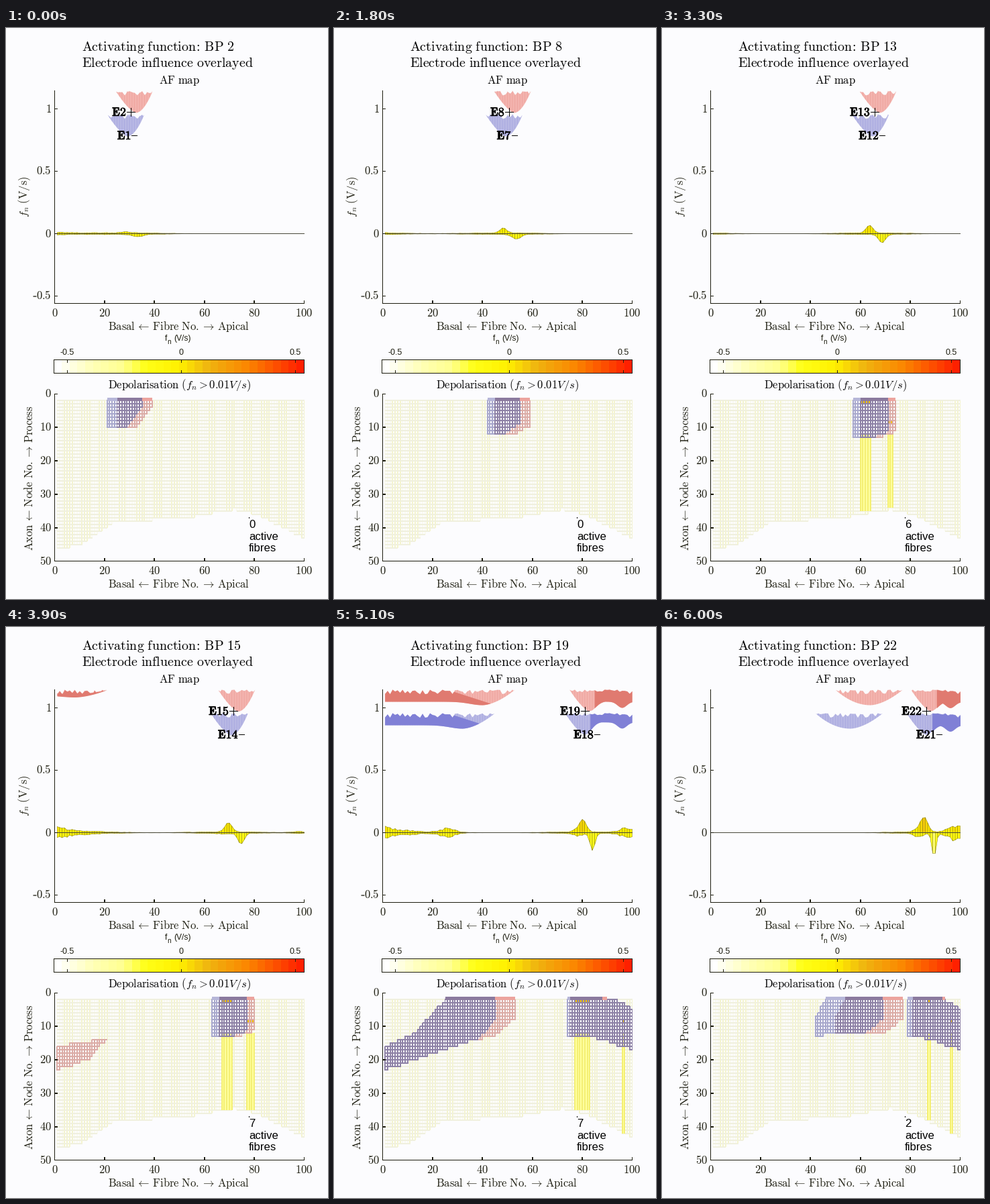
These frames come from a looping animation (480 px wide and 851 px high, 6.3 s). A matplotlib script:

```python
import numpy as np
import matplotlib.pyplot as plt
from matplotlib.animation import FuncAnimation
from matplotlib.collections import LineCollection, PolyCollection
from matplotlib.colors import LinearSegmentedColormap
from matplotlib.patches import Rectangle
from matplotlib.patheffects import withStroke

plt.rcParams["mathtext.fontset"] = "cm"
plt.rcParams["font.family"] = "Liberation Sans"

W, H, DPI = 480, 851, 100
PX = 72 / DPI
INK, BG = "#1d1d10", "#fcfcfe"

fig = plt.figure(figsize=(W / DPI, H / DPI), dpi=DPI, facecolor=BG)
ax = fig.add_axes([0, 0, 1, 1])
ax.set_xlim(0, W)
ax.set_ylim(H, 0)
ax.set_autoscale_on(False)
ax.axis("off")

heat = LinearSegmentedColormap.from_list("heat", [
    (0, "#ffffff"), (.15, "#ffffb4"), (.27, "#ffff90"), (.36, "#ffff18"),
    (.5, "#fff000"), (.62, "#efb410"), (.78, "#fb8600"), (1, "#ff2000")], N=32)

fibres = np.arange(1, 101)
nodes = np.arange(51)
fine = np.linspace(1, 100, 397)
teeth = np.random.default_rng(4).uniform(0, 1, 100) ** 2 * 7
floor = np.round(np.interp(fibres, [1, 10, 25, 53, 72, 81, 100],
                           [46.4, 45, 38, 37, 34.4, 36, 43]))


def fx(f):
    return 72.5 + 3.72 * f


def vy(v):
    return 306.5 - 186 * v


def ny(k):
    return 545.5 + 4.98 * k


def bell(x, c, w):
    return np.exp(-((x - c) / w) ** 2)


def label(x, y, s, size, ha="center", color=INK, **kw):
    return ax.text(x, y, s, fontsize=size * PX, ha=ha, va="baseline", color=color, **kw)


def roman(s):
    return rf"$\mathrm{{{s}}}$"


def lines(segs, color, lw=1, z=2, aa=False, **kw):
    c = LineCollection(segs, colors=color, linewidths=lw * PX, zorder=z,
                       antialiaseds=aa, snap=False, **kw)
    return ax.add_collection(c, autolim=False)


def box(x0, x1, y0, y1, color, z):
    return ax.add_patch(Rectangle((x0, y0), x1 - x0, y1 - y0, color=color, lw=0, zorder=z))


def runs(values):
    """Split integers into stretches of neighbours."""
    parts = np.split(values, np.where(np.diff(values) > 1)[0] + 1)
    return [(p[0], p[-1]) for p in parts if len(p)]


def centre(n):
    return np.interp(n, [1, 8, 15, 18, 22], [29, 52.5, 73.5, 81.1, 88.3])


def main_lobe(n):
    c = centre(n)
    return c - 8, c, c + 6.8 + 6 * max(0, n - 15)


def side_lobe(n):
    """Influence on the neighbouring turn, for the apical electrodes."""
    b = 8 * n - 99
    return (1 if n < 20 else b - 27), b


def depth(n):
    """Depth in pixels of an electrode's surface: main lobe and side lobe."""
    lo, c, hi = main_lobe(n)
    left = 1 - np.clip((c - fine) / (c - lo), 0, 1) ** 1.4
    right = 1 - np.clip((fine - c) / (hi - c), 0, 1) ** 1.9
    if n > 16:
        valley = min(.14 * (n - 15), .55)
        right = np.maximum(valley + (1 - valley) * bell(fine, c, 3.6) - .02,
                           valley + .28 * bell(fine, 96, 2.6))
    main = 32.5 * np.where(fine < c, left, right)
    side = np.zeros_like(fine)
    if n >= 15:
        a, b = side_lobe(n)
        peak = b - 13
        rise = .78 + .22 * bell(fine, peak, 7)
        if a > 1:
            rise = 1 - np.clip((peak - fine) / (peak - a), 0, 1) ** 2
        fall = 1 - np.clip((fine - peak) / 13, 0, 1) ** 1.7
        side = min(5 * n - 64, 23) * np.where(fine < peak, rise, fall)
    return main, side


def cone(n, y0, light, dense):
    main, side = depth(n)
    d = np.maximum(main, side)
    x, low, on = fx(fine), y0 + d, d > .2
    top = y0 + np.minimum(np.interp(fine, fibres, teeth), d * .6)
    out = [ax.fill_between(x, top, low, where=on, color=light, lw=0, zorder=3)]

    # Overlapping layers look denser towards the turn's ends
    shade = np.maximum(top, y0 + 1.2 * (fine - 26) * (fine < 46))
    thick = (side > .2) & (fine < 46) & (shade < low)
    if n > 16:
        thick |= fine > centre(n) + 2
    out.append(ax.fill_between(x, shade, low, where=thick, color=dense, lw=0, zorder=3))
    segs = [[(x[i], top[i]), (x[i], low[i])] for i in range(0, len(x), 4) if on[i]]
    out.append(lines(segs, dense, .8, 3.1, aa=True, alpha=.3))
    return out


def node_mask(n):
    """Fibre by node cells reached by an electrode."""
    f, k = fibres[:, None], nodes[None]
    lo, _, hi = main_lobe(n)
    top = 2 + .375 * np.maximum(0, f - 92)
    bottom = (min(9.2 + .33 * n, 13) + .25 * np.maximum(0, f - 84)
              - max(.3, 1.2 - .1 * n) * np.maximum(0, f - hi + 6))
    m = (f >= lo) & (f <= hi) & (k >= np.floor(top)) & (k <= np.round(bottom))
    if n >= 15:
        a, b = side_lobe(n)
        grown = min((n - 15) / 3, 1)
        top = (grown * np.interp(f, [1, 13, 22, 26], [16, 12, 4, 2])
               + (1 - grown) * (16 - .1 * f))
        if a > 1:
            top = top + 1.2 * np.maximum(0, a + 4 - f)
        bottom = (np.interp(f, [1, 13, 32, 48], [23, 20, 15, 12])
                  - .6 * np.maximum(0, f - b + 7))
        m |= (f >= a) & (f <= b) & (k >= np.round(top)) & (k <= np.round(bottom))
    return m


def mesh(m, color, z):
    segs = [[(fx(i + 1), ny(k)), (fx(i + 1), ny(k + 1))]
            for i, k in np.argwhere(m[:, :-1] & m[:, 1:])]
    segs += [[(fx(i + 1), ny(k)), (fx(i + 2), ny(k))]
             for i, k in np.argwhere(m[:-1] & m[1:])]
    return lines(segs, color, 1, z)


def influence(n):
    neg, pos = node_mask(n - 1), node_mask(n)
    out = [mesh(neg, "#a8a8cc", 2), mesh(pos, "#dbaca6", 2.1),
           mesh(neg & pos, "#8e82a6", 2.2)]
    bar_neg = neg[:, 2] & (fibres < centre(n - 1) + 7.5)
    bar_pos = pos[:, 2] & (fibres < centre(n) + 7.5)
    for on, color, z in ((bar_neg, "#b6b6d8", 2.3), (bar_pos, "#eca49e", 2.4),
                         (bar_neg & bar_pos, "#8b7a9e", 2.5)):
        out += [box(fx(a), fx(b), 551, 556, color, z) for a, b in runs(fibres[on])]
    return out


def envelope(n):
    """Upper and lower extent of the activating function, in pixels."""
    f, p, q = fibres, centre(n - 1), centre(n)
    rng = np.random.default_rng(100 + n)
    tail = 2.4 - .1 * n + 12 * np.exp(-((n - 17) / 2.6) ** 4)
    end = 1.4 * max(0, n - 14)
    base = (.1 + 1.3 * bell(f, p, 18) + tail * np.exp(-(f - 1) / 10)
            + end * (bell(f, 98, 4) + .6 * bell(f, p - 3, 2.5))
            + 6 * bell(n, 19, 1.5) * bell(f, 26, 4))
    up, down = base * rng.uniform(.6, 1.1, (2, 100))
    up += .9 * n * bell(f, p - .8, 1.9)
    down += 2.6 * np.exp(.12 * n) * bell(f, q + 1.2, 3.2 - .095 * n)
    return up, down


def trace(n):
    x = fx(fibres)
    out = []
    for sign, amp in zip((1, -1), envelope(n)):
        y = 306.5 - sign * amp
        quads = [[(x[i], 306.5), (x[i], y[i]), (x[i + 1], y[i + 1]), (x[i + 1], 306.5)]
                 for i in range(99)]
        level = sign * (amp[1:] + amp[:-1]) / 2 / 186
        p = PolyCollection(quads, facecolors=heat(.46 + level * .9), edgecolors="#7c7200",
                           linewidths=.45 * PX, zorder=3, snap=False)
        out.append(ax.add_collection(p, autolim=False))
    out.append(lines([[(x[0], 306.5), (x[-1], 306.5)]], "#4a4a3c", 1, 3.2))
    return out


def active(n):
    """Number of active fibres and the two groups they form."""
    total = round(np.interp(n, [8, 11, 15, 19, 22], [0, 6, 7, 7, 2]))
    if not total:
        return 0, []
    second = round(1 + 2 * bell(n, 15, 2))
    a = round(centre(n) - np.interp(n, [11, 19, 22], [7.5, 6, 1.5]))
    b = 96 if n >= 19 else round(centre(n) + 3.1)
    return total, [(a, a + total - second), (b, b + second)]


def stripes(groups):
    out = []
    for j, (a, b) in enumerate(groups):
        x0, x1 = fx(a), fx(b)
        low = ny(floor[a - 1:b].min())
        out.append(box(x0, x1, ny(12), low, "#ffff9e", 1.5))
        segs = [[(fx(f), ny(12)), (fx(f), low)] for f in range(a, b + 1)]
        out.append(lines(segs, "#f4ef74", 1, 1.6))
        k = 8 if j else 2
        out.append(box(x0, x1, ny(k), ny(k + 1), "#f5c400", 1.7))
    return out


def static():
    # Faint node mesh; every other band of columns is stronger
    cols = [[(fx(f), ny(2)), (fx(f), ny(k))] for f, k in zip(fibres, floor)]
    strong = (fibres - 3.6) % 7.2 < 3.7
    lines([s for s, on in zip(cols, strong) if on], "#f5f5cc", 1, 1, linestyles=[(0, (2, 1))])
    lines([s for s, on in zip(cols, strong) if not on], "#fafaf0", 1, 1)
    rows = [[(fx(a), ny(k)), (fx(b), ny(k))] for k in range(2, 47)
            for a, b in runs(fibres[floor >= k])]
    lines(rows, "#f0f0de", 1, 1, linestyles=[(0, (1, 1))])

    # Axes, ticks and tick labels
    segs = []
    for top, bottom in ((93, 410.5), (545, 794.5)):
        segs += [[(72.5, top), (72.5, bottom)], [(72, bottom), (445, bottom)]]
        for f in range(0, 101, 20):
            segs.append([(fx(f), bottom), (fx(f), bottom - 4)])
            label(fx(f), bottom + 19, roman(f), 16.6)
    rows = [(vy(v), f"{abs(v):g}") for v in (1, .5, 0, -.5)]
    rows += [(ny(k), k) for k in range(0, 51, 10)]
    for y, s in rows:
        segs.append([(72.5, y), (76.5, y)])
        label(67.5, y + 5, roman(s), 16.6, "right")
    lines([[(40.5, 400), (45.5, 400)]], INK, 1.3, 4, aa=True)

    # Colour bar
    ax.pcolormesh(np.linspace(71.5, 444.5, 33), [494.5, 514.5],
                  np.linspace(0, 1, 32)[None], cmap=heat, zorder=1)
    frame = [(71.5, 494.5), (444.5, 494.5), (444.5, 514.5), (71.5, 514.5), (71.5, 494.5)]
    segs.append(frame)
    for x, s in ((91.5, "-0.5"), (261.5, "0"), (431.5, "0.5")):
        segs += [[(x, 494.5), (x, 498.5)], [(x, 514.5), (x, 510.5)]]
        label(x, 487, s, 12.5)
    lines(segs, INK, 1, 4)
    label(237, 466, "f", 12, "left")
    label(240.5, 471, "n", 10, "left")
    label(250, 466, "(V/s)", 12, "left")

    # Titles and axis labels
    label(113, 58, roman(r"Electrode\ influence\ overlayed"), 20, "left", "k")
    label(258.5, 83, roman(r"AF\ map"), 16.6, color="k")
    label(258, 537, r"$\mathrm{Depolarisation}\ (f_n>0.01V/s)$", 16.6, color="k")
    for y in (450, 834):
        label(258, y, roman(r"Basal\,\leftarrow\,Fibre\ No.\rightarrow\,Apical"), 16.6)
    turn = dict(rotation=90, rotation_mode="anchor")
    label(40, 671, roman(r"Axon\,\leftarrow\,Node\ No.\rightarrow\,Process"), 16.6, **turn)
    label(32, 251, r"$f_n\ \mathrm{(V/s)}$", 16.6, **turn)
    label(362, 763, "active", 16.8, "left", "k")
    label(362, 780, "fibres", 16.8, "left", "k")
    box(362, 363, 729, 731, "k", 4)


static()
title = label(113, 34, "", 20, "left", "k")
count = label(362, 745, "", 16.8, "left", "k")
bold = dict(zorder=6, path_effects=[withStroke(linewidth=.7 * PX, foreground="k")])
plus = label(0, 131, "", 18, "right", "k", **bold)
minus = label(0, 166, "", 18, "right", "k", **bold)
live = []


def electrode_labels(n):
    x = np.floor(fx(centre(n))) + 1
    plus.set_text(rf"$\mathbf{{E{n}}}$")
    plus.set_x(x - 13)
    x2 = np.floor(fx(centre(n - 1)) + 15.5 + .4 * n)
    minus.set_text(rf"$\mathbf{{E{n - 1}}}$")
    minus.set_x(x2 - 9)
    return lines([[(x - 13, 125.5), (x, 125.5)], [(x - 6.5, 119), (x - 6.5, 132)],
                  [(x2 - 9, 160.5), (x2, 160.5)]], "k", 1, 6)


def draw(i):
    for a in live:
        a.remove()
    live.clear()
    n = i + 2
    total, groups = active(n)
    title.set_text(roman(rf"Activating\ function\!:\:BP\ {n}"))
    count.set_text(str(total))
    live.extend(cone(n, 93.5, "#f3b3ae", "#e07a70"))
    live.extend(cone(n - 1, 128.5, "#b8b8e4", "#8080d6"))
    live.append(electrode_labels(n))
    live.extend(trace(n))
    live.extend(stripes(groups))
    live.extend(influence(n))
    return live


anim = FuncAnimation(fig, draw, frames=21, interval=300, repeat=True,
                     repeat_delay=0, blit=False)
plt.show()
```
